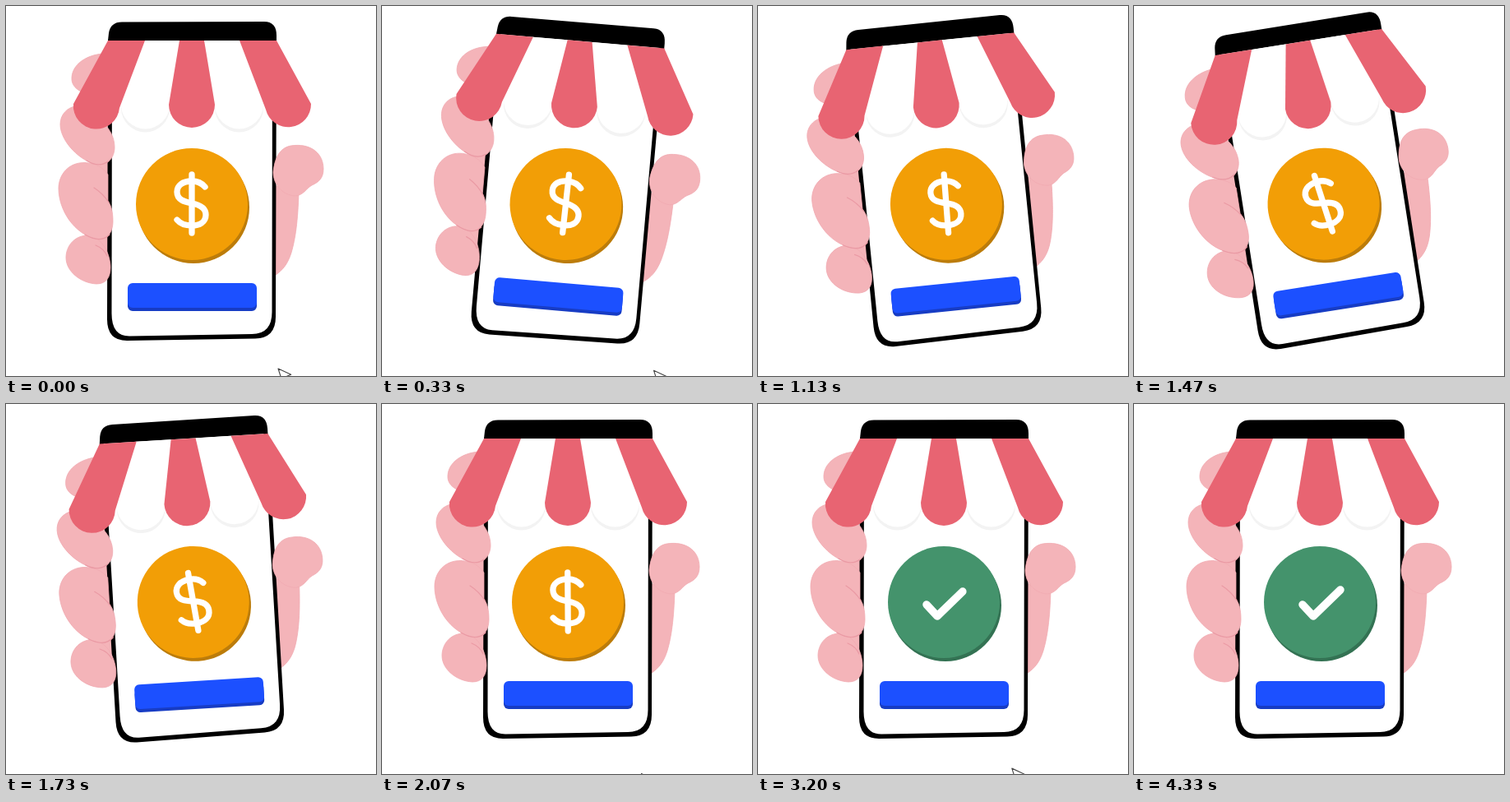
An HTML page for the animation above (4390 ms loop, 450 by 450 pixels).

```html
<!DOCTYPE html>
<html lang="en">
<head>
<meta charset="utf-8">
<title>Mobile checkout</title>
<style>
  html, body { margin: 0; height: 100%; overflow: hidden; background: #fff; }
  svg { display: block; width: 100%; height: 100%; }
  .skin { fill: #f4b4b9; stroke: #f1abb2; stroke-width: 0.8; }
  .crease { fill: none; stroke: #ea9aa4; stroke-width: 1.2; stroke-linecap: round; }
  .red { fill: #e86472; }
  .mark { fill: none; stroke: #fff; stroke-linecap: round; stroke-linejoin: round; }
</style>
</head>
<body>
<svg viewBox="0 0 450 450">
  <defs>
    <path id="white" d="M168 42 H211 L199 120 A29 29 0 0 1 140 120 Z M241 42 H284 L313 120 A29 29 0 0 1 254 120 Z"/>
  </defs>
  <g id="phone">
    <!-- palm and top finger, behind the phone -->
    <path class="skin" d="M325 218 L356 226 C355 262 352 283 347 300 C343 313 337 321 328 327 Z"/>
    <path class="skin" d="M128 58 C104 56 81 68 80 87 C79 101 94 110 128 111 Z"/>
    <path fill="#f4b4b9" d="M98 193 L128 187 V302 L98 284 Z"/>

    <path d="M124 42 L125 33 Q127 19.500 141 19.500 L314 19 Q329 19 329 36 L328 378 Q328 404 303 404.500 L147 407 Q123 407 123 381 Z"/>
    <path fill="#fff" d="M129 42 L324 42 L323.500 372 Q323.500 399 299 399 L150 401.500 Q128.500 401.500 128.500 374 Z"/>

    <!-- fingers and thumb -->
    <path class="skin" d="M98 279 C82 280 73 293 73 306 C73 323 91 337 110 338 C122 338 127 330 127 318 C127 303 118 280 98 279 Z"/>
    <path class="crease" d="M109 291 Q119 295 123 304"/>
    <path class="skin" d="M96 190.500 C76 190 64 205 64 222 C64 247 82 278 112 284 C123 285 130 275 130 262 C130 250 128 243 124 237 L124 205 C118 196 108 191 96 190.500 Z"/>
    <path class="crease" d="M107 221 Q118 228 125 239"/>
    <path class="skin" d="M88 121 C73 123 66 133 66 144 C66 165 91 190 112 193 C124 194 132 184 132 172 C132 156 122 143 108 133 C101 127 96 121 88 121 Z"/>
    <path class="crease" d="M98 188 Q113 197 124 189 M96 278 Q115 289 126 278"/>
    <path class="skin" d="M351 169.500 C334 170 327 183 325 202 C325 216 335 230 352 231 C362 230 365 222 372 218 C381 214 386 209 386 198 C386 180 372 168 351 169.500 Z"/>

    <!-- awning -->
    <use href="#white" y="4" fill="#f3f3f3"/>
    <use href="#white" fill="#fff"/>
    <path class="red" d="M124 42 H169 L138 124 A28.100 28.100 0 0 1 82 119 Z"/>
    <path class="red" d="M211 42 H241 L254 120 A28 28 0 0 1 198 120 Z"/>
    <path class="red" d="M284 42 H329 L371 119 A27.900 27.900 0 0 1 316 126 Z"/>

    <!-- coin -->
    <circle id="side" r="68"/>
    <circle id="face" r="68"/>
    <g id="dollar" class="mark" stroke-width="7.300">
      <path d="M226 205 V276"/>
      <path d="M242 220 C237 214 232 213 226 213 C214 213 208 219 208 226 C208 236 217 238 226 240 C237 242 243 246 243 254 C243 263 235 267 226 267 C218 267 212 265 208 260"/>
    </g>
    <path id="check" class="mark" stroke-width="9.500" d="M205 244 L218 258 L251 226" pathLength="100"/>

    <!-- button -->
    <rect x="148" y="343" width="157" height="28" rx="6" fill="#173cc4"/>
    <rect id="button" x="148" width="157" height="30" rx="6" fill="#1c50ff"/>
    <g id="spark" stroke="#e6b84f" stroke-width="1.600" stroke-linecap="round"></g>
  </g>
  <path id="cursor" d="M0 0 L4.500 14 L7.500 9.500 L11 13.500 L12.500 12 L9 8.500 L14 6.500 Z" fill="#fff" stroke="#444" stroke-width="1" stroke-linejoin="round"/>
</svg>
<script>
const LOOP = 4390;
const $ = id => document.getElementById(id);
const set = (id, attrs) => {
  for (const k in attrs) $(id).setAttribute(k, attrs[k]);
};
const span = (t, a, b) => Math.min(1, Math.max(0, (t - a) / (b - a)));
const sine = p => (1 - Math.cos(Math.PI * p)) / 2;
const mix = (a, b, p) => a + (b - a) * p;
const blend = (a, b, p) => `rgb(${a.map((v, i) => Math.round(mix(v, b[i], p)))})`;

// Swing right, left and back to rest; the dollar sign trails behind the phone.
const swing = t =>
  sine(span(t, 0, 667)) - 2 * sine(span(t, 667, 1333)) + sine(span(t, 1333, 2000));

function cursorAt(t) {
  if (t < 1100) return [331 - t / 730, 441 + t * 0.007];
  if (t < 2065) return [331, 470];
  if (t < 2700) {
    const p = 1 - (1 - span(t, 2065, 2500)) ** 2;
    return [mix(318, 226, p), mix(452, 363, p)];
  }
  const p = sine(span(t, 2730, 3330));
  return [mix(226, 319, p), mix(363, 453, p)];
}

function sparkle(t) {
  const p = span(t, 2500, 2720);
  if (p === 0 || p === 1) return "";
  return [195, 232, 270, 305].map(deg => {
    const a = deg * Math.PI / 180, r = 3 + 8 * p, end = r + 3.5 * Math.sin(Math.PI * p);
    const at = d => [149 + d * Math.cos(a), 344 + d * Math.sin(a)];
    const [x1, y1] = at(r), [x2, y2] = at(end);
    return `<line x1="${x1}" y1="${y1}" x2="${x2}" y2="${y2}"/>`;
  }).join("");
}

function draw(t) {
  const press = sine(span(t, 2450, 2560)) - sine(span(t, 2670, 2800));
  const paid = span(t, 2670, 2800);
  const tick = span(t, 2800, 3330);
  const [x, y] = cursorAt(t);

  set("phone", { transform: `rotate(${10 * swing(t)} 226 212)` });
  set("face", { cx: 226, cy: 241 + 3 * press, fill: blend([242, 158, 6], [68, 147, 108], paid) });
  set("side", { cx: 228 - 1.5 * press, cy: 245 - 0.5 * press, fill: blend([188, 124, 10], [51, 114, 83], paid) });
  set("dollar", { opacity: 1 - paid, transform: `rotate(${9 * swing(t - 165)} 226 241)` });
  set("check", {
    "stroke-dasharray": `${100 * (1 - (1 - tick) ** 2 * (1 - 0.3 * tick))} 200`,
    opacity: tick > 0 ? 1 : 0
  });
  set("button", { y: 337 + 4 * press });
  $("spark").innerHTML = sparkle(t);
  set("cursor", { transform: `translate(${x} ${y}) scale(${1.12 - 0.2 * press})` });
}

function frame(now) {
  draw(now % LOOP);
  requestAnimationFrame(frame);
}
draw(0);
requestAnimationFrame(frame);
</script>
</body>
</html>
```
